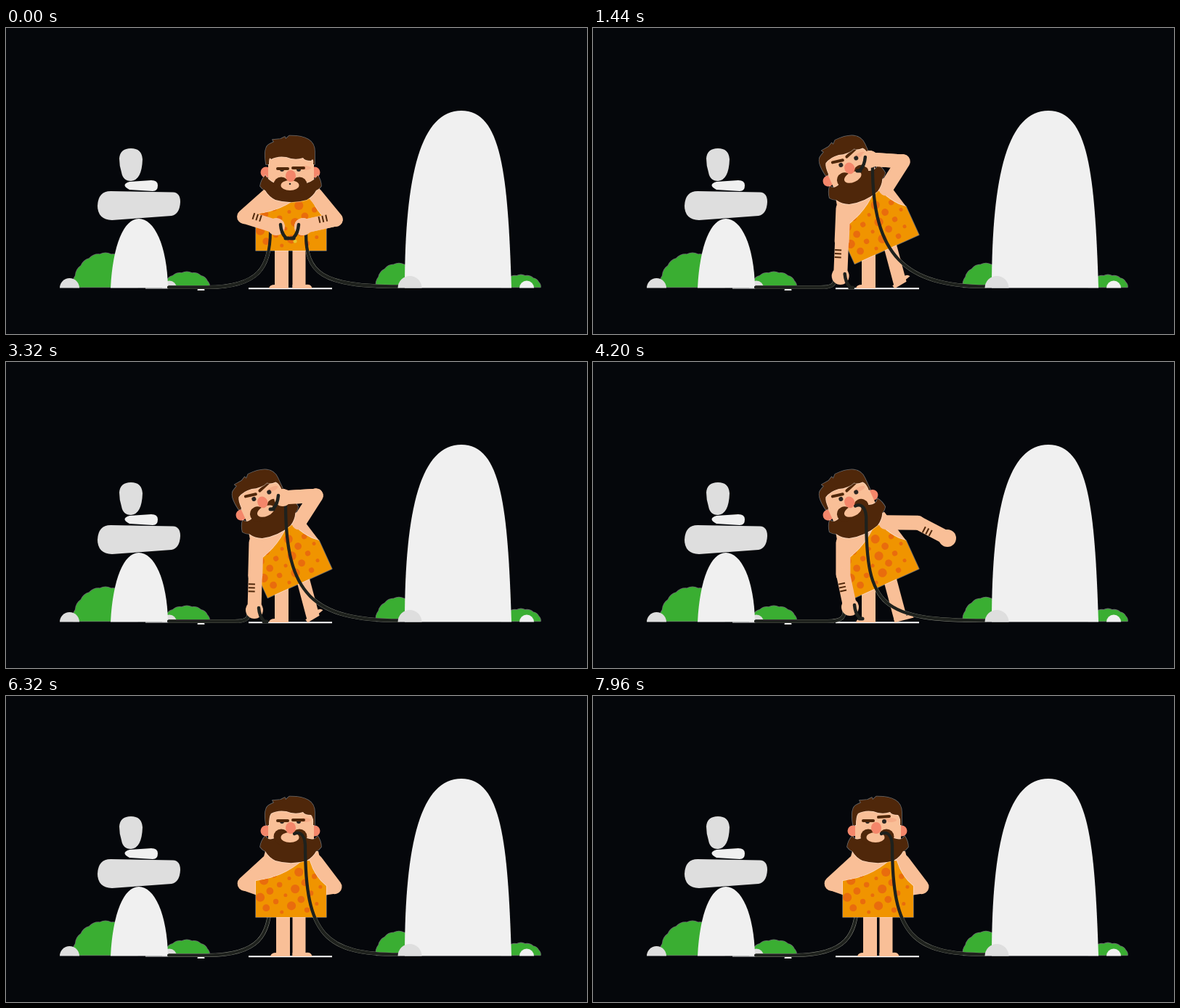
Animation, 800 px wide and 422 px high, one loop 8000 ms. Source, as an HTML page with a canvas:

```html
<!DOCTYPE html>
<html lang="en">
<head>
<meta charset="utf-8">
<title>Caveman with cables</title>
<style>
html, body { margin: 0; width: 100%; height: 100%; overflow: hidden; background: #05070b; }
canvas { display: block; }
</style>
</head>
<body>
<canvas id="stage" width="800" height="422"></canvas>
<script>
const LOOP = 8000, GROUND = 358.5, UPPER_ARM = 44, FOREARM = 46;
const ctx = document.getElementById('stage').getContext('2d');
const C = {
  bg: '#05070b', pale: '#f0f0f0', grey: '#dedede', bush: '#3aae32',
  skin: '#f9bf97', blush: '#f4866a', hair: '#4f270a', robe: '#f09400', spot: '#e96c0d',
  cable: '#1e211d', halo: '#8d8f84', edge: 'rgba(255, 255, 255, 0.4)',
  red: '#dd1f1a', yellow: '#e8c62c', eye: '#2a2622'
};

// Each pose names only what differs from the one it builds on.
const front = { lean: 0, look: 1, left: [372, 274], right: [409, 274], bend: 1, plugged: 0, tuck: 0, glance: 0 };
const raise = { ...front, lean: 1, look: 0, left: [331, 342], right: [380, 137], bend: -1 };
const bite = { ...raise, left: [342, 342], right: [381, 187] };
const tug = { ...bite, right: [425, 142], bend: 0, plugged: 1 };
const fling = { ...tug, left: [354, 338], right: [488, 243], bend: 1 };
const hide = { ...fling, left: [348, 340], right: [400, 262], tuck: 1 };
const stand = { ...hide, lean: 0, left: front.left, right: [407, 270] };
const wink = { ...stand, glance: 1 };
const TIMELINE = [
  [80, front], [500, raise], [1050, raise], [1550, bite], [3420, bite], [3640, tug],
  [3900, fling], [5000, fling], [5280, hide], [5920, hide], [6240, stand], [6800, stand], [7050, wink]
];

const mix = (a, b, u) => Array.isArray(a) ? a.map((v, i) => mix(v, b[i], u)) : a + (b - a) * u;

function poseAt(t) {
  const i = TIMELINE.findIndex(([time]) => time > t);
  if (i < 0) return wink;
  if (i === 0) return front;
  const [t0, a] = TIMELINE[i - 1], [t1, b] = TIMELINE[i];
  const u = (t - t0) / (t1 - t0), eased = u * u * (3 - 2 * u);
  return Object.fromEntries(Object.keys(a).map(k => [k, mix(a[k], b[k], eased)]));
}

const line = (d, color, width, cap = 'round') => {
  ctx.strokeStyle = color; ctx.lineWidth = width;
  ctx.lineCap = cap; ctx.lineJoin = 'round';
  ctx.stroke(new Path2D(d));
};
const fill = (d, color, edge) => {
  if (edge) line(d, edge, 1.6);
  ctx.fillStyle = color; ctx.fill(new Path2D(d));
};
const oval = (x, y, rx, color, ry = rx, from = 0, to = 2 * Math.PI) => {
  ctx.fillStyle = color;
  ctx.beginPath(); ctx.ellipse(x, y, rx, ry, 0, from, to); ctx.fill();
};
const dome = (x, r, color, y = GROUND) => oval(x, y, r, color, r, Math.PI, 2 * Math.PI);

// Path through the points where every side bulges to its left.
const lobes = (points, bulge) => points.map(([x, y], i) => {
  if (!i) return `M${x},${y}`;
  const [px, py] = points[i - 1];
  return `Q${(x + px) / 2 + (y - py) * bulge},${(y + py) / 2 - (x - px) * bulge} ${x},${y}`;
}).join(' ');

function bush(x, rx, ry, count) {
  const points = Array.from({ length: count + 1 }, (_, i) => {
    const a = Math.PI * (1 + i / count);
    return [x + rx * Math.cos(a), GROUND - 1 + ry * Math.sin(a)];
  });
  fill(lobes(points, 0.25) + 'Z', C.bush, C.edge);
}

function drawScenery() {
  bush(137, 44, 46, 9);
  bush(249, 31, 20, 7);
  dome(87.5, 13.5, C.grey);
  dome(225, 10, C.grey);
  fill(`M144,${GROUND} C147,300 162,263 183,263 S222,300 223,${GROUND} Z`, C.pale);
  fill('M144,225 L230,226.500 Q240,227 240,240 Q239,257 228,259 L146,265 Q126,264 126,245 Q127,225 144,225 Z', C.grey);
  fill('M170,212 L200,210 Q209,210 209,217 Q209,225 202,225 L170,223 Q157,216 170,212 Z', C.pale);
  fill('M156,180 Q157,166 172,166 T188,181 Q187,210 172,211 Q161,211 159,199 Q156,190 156,180 Z', C.grey);
  line('M192,359 H268', C.pale, 1, 'butt');
  dome(268.5, 5, C.pale, 362);

  bush(541, 31, 32, 7);
  bush(709, 27, 16, 7);
  fill(`M549,${GROUND} C549,200 572,114 627,114 S691,200 696,${GROUND} Z`, C.pale);
  dome(717, 10, C.pale);
  line('M334,359.300 H449', '#fff', 2, 'butt');
}

function drawLegs(t, { lean, look }) {
  const shift = 2 * (1 - look) * (1 - lean);
  fill(`M${370 + shift},298 h19 v61 h-27 q1,-5 8,-5 Z`, C.skin);
  const tap = Math.exp(-(((t - 4200) / 250) ** 2));
  ctx.save();
  ctx.translate(403.5 + 5.5 * lean, 300);
  ctx.rotate(-0.26 * lean);
  fill('M-9,-8 H9 V54 L-9,59 Z', C.skin);
  ctx.translate(-9, 59);
  ctx.rotate(-0.42 * lean * (1 - tap));
  fill('M0,0 V-5 H18 Q26,-6 27,0 Z', C.skin);
  ctx.restore();
}

function drawRobe() {
  const robe = 'M344,305 V255 Q382,250 408,227 H418 Q425,250 441,262 V305 Z';
  fill('M357,214 H430 L441,262 H344 Z', C.skin);
  fill(robe, C.robe, C.edge);
  ctx.save();
  ctx.clip(new Path2D(robe));
  for (let i = 0; i < 21; i++) oval(347 + (i * 0.618 % 1) * 91, 240 + i * 2.9, 2.5 + i * 7 % 4 * 1.2, C.spot);
  ctx.restore();
}

// Two-bone arm: the elbow follows from the shoulder and the hand.
function solveArm(shoulder, [hx, hy], bend) {
  const dx = hx - shoulder.x, dy = hy - shoulder.y, d = Math.hypot(dx, dy);
  const scale = Math.max(1, d / (UPPER_ARM + FOREARM)), u = UPPER_ARM * scale, f = FOREARM * scale;
  const along = (d * d + u * u - f * f) / (2 * d);
  const out = bend * Math.sqrt(Math.max(0, u * u - along * along));
  const elbow = [shoulder.x + (dx * along + dy * out) / d, shoulder.y + (dy * along - dx * out) / d];
  return { shoulder, elbow, hand: [hx, hy] };
}

function drawForearm({ elbow: [ex, ey], hand: [hx, hy] }, bandSide) {
  line(`M${ex},${ey} L${hx},${hy}`, C.skin, 19);
  oval(hx, hy, 12, C.skin);
  if (!bandSide) return;
  ctx.save();
  ctx.translate(ex, ey);
  ctx.rotate(Math.atan2(hy - ey, hx - ex));
  for (let x = 12; x <= 22; x += 5) line(`M${x},0 V${-9 * bandSide}`, C.hair, 2, 'butt');
  ctx.restore();
}

function drawArm(arm, bandSide) {
  line(`M${arm.shoulder.x},${arm.shoulder.y} L${arm.elbow}`, C.skin, 20);
  drawForearm(arm, bandSide);
}

function drawPlug([hx, hy], side, sparkle) {
  const x = hx + 13 * side, y = hy + 15;
  if (sparkle) oval(x + 2, y + 5, 2.5, C.yellow);
  line(`M${hx + 6 * side},${hy - 3} Q${hx + 7 * side},${hy + 9} ${x},${y}`, C.cable, 4.5);
  line(`M${x},${y + 1} h${4 * side}`, C.cable, 5);
}

// Looking down moves the features further than the skull.
function drawHead({ lean, look, glance }, tongue) {
  const skull = 8 * look, face = 20 * look, turn = -2 * glance, angry = lean;
  const shifted = (dy, paint) => { ctx.save(); ctx.translate(0, dy); paint(); ctx.restore(); };

  [358, 425].forEach(x => oval(x, 186 + 11 * look, 7.5, C.blush));
  shifted(skull, () => {
    fill('M361,158 H424 V205 H361 Z', C.skin);
    const chin = [[429, 193], [434, 208], [427, 214], [414, 227], [371, 227], [357, 214], [350, 208], [357, 193]];
    fill(lobes(chin, 0.15) + `Q361,200 370,${196 + skull} H414 Q426,200 429,193 Z`, C.hair, C.edge);
  });

  shifted(face, () => {
    [379, 404].forEach(x => oval(x, 194, 10.5, C.hair));
    oval(391 + turn, 195, 12.5, C.skin, 7);
    if (look > 0.5) oval(391, 193, 1.3, C.eye);
    if (tongue) oval(383, 188, 5, C.red, 2.6);

    oval(412 + turn, 171, 8, '#f5ad88', 3);
    const eye = (x, open) => oval(x + turn, 173, 3, C.eye, 3, open ? -Math.PI : 0, Math.PI);
    eye(380 + 3 * angry, angry > 0.5);
    eye(403 + 3 * angry, angry > 0.5 || glance > 0.5);
    line(`M${374 + turn},${172 - 7 * angry} L${388 + turn},${172 - 4 * angry}`, C.hair, 4);
    line(`M${395 + turn},${171 - 5 * angry - 4 * glance} L${410 + turn},${171 - 10 * angry - 5 * glance}`, C.hair, 4);
    oval(392 + turn, 182, 7, C.blush, 8);
  });

  const brim = 161 + 9 * look;
  shifted(skull, () => fill(`M358,178 Q354,154 363,150 L369,147 367,144 378,143 384,140 385,143 390,138.500
    Q425,138 425,160 V178 H423 Q424,168 420,${brim + 3} Q411,${brim + 3} 409,${brim - 1}
    Q398,${brim + 3} 386,${brim - 2} Q374,${brim - 4} 365,${brim + 1} Q362,166 362,178 Z`, C.hair, C.edge));
}

function draw(t) {
  const pose = poseAt(t), { lean, look, left, right, plugged, tuck } = pose;
  const body = new DOMMatrix().translate(393 + 12 * lean, 305 + 2 * look)
    .rotate(-24.4 * lean).translate(-393, -305);
  const place = (x, y) => body.transformPoint({ x, y });
  const inBody = paint => { ctx.save(); ctx.setTransform(body); paint(); ctx.restore(); };

  const holding = plugged < 0.5, upright = lean < 0.5, armUp = right[1] < 170;
  const rightBehind = tuck > 0.5, leftBehind = rightBehind && upright;
  const leftArm = solveArm(place(361, 229), left, -1);
  const rightArm = solveArm(place(426, 228), right, pose.bend);
  const leftBand = upright ? 1 : -1, rightBand = plugged || upright ? -1 : 0;

  const lx = left[0] - 8, ly = left[1] + 6, drop = 357 - ly;
  const leftCable = `M${lx},${ly} C${lx},${ly + 0.65 * drop} ${lx - 0.18 * drop - 2},357.500 ${lx - 10 - drop},357.500 H224`;

  // The higher the cable starts, the tauter it hangs.
  const mouth = place(397, 190);
  const [x, y] = mix([right[0] + 4, right[1] + 9], [mouth.x + 15, mouth.y + 15], plugged);
  const taut = 1.1 * Math.max(0, 212 - y);
  const lead = holding ? `M${x},${y}` : `M${mouth.x},${mouth.y} C${mouth.x + 6},${mouth.y - 3} ${x - 1},${mouth.y - 1} ${x},${y}`;
  const rightCable = `${lead} C${x},${338 - taut} ${x + 20 + taut},356.500 542,356.500`;

  ctx.fillStyle = C.bg;
  ctx.fillRect(0, 0, 800, 422);
  drawScenery();
  [leftCable, rightCable].forEach(d => line(d, C.halo, 5, 'butt'));
  line(leftCable, C.cable, 4);

  if (leftBehind) drawArm(leftArm, 0);
  if (rightBehind) drawArm(rightArm, 0);
  drawLegs(t, pose);
  inBody(drawRobe);
  if (!leftBehind) {
    line(leftCable, C.cable, 4);
    drawArm(leftArm, leftBand);
    drawPlug(left, 1, false);
  }
  if (!rightBehind) drawArm(rightArm, rightBand);
  inBody(() => drawHead(pose, holding && armUp && !upright));
  line(rightCable, C.cable, 4.3);
  if (holding) {
    drawForearm(rightArm, rightBand);
    drawPlug(right, -1, upright || armUp);
  }
  dome(556, 16.5, C.grey);
}

function tick() {
  draw(performance.now() % LOOP);
  requestAnimationFrame(tick);
}
tick();
</script>
</body>
</html>
```
